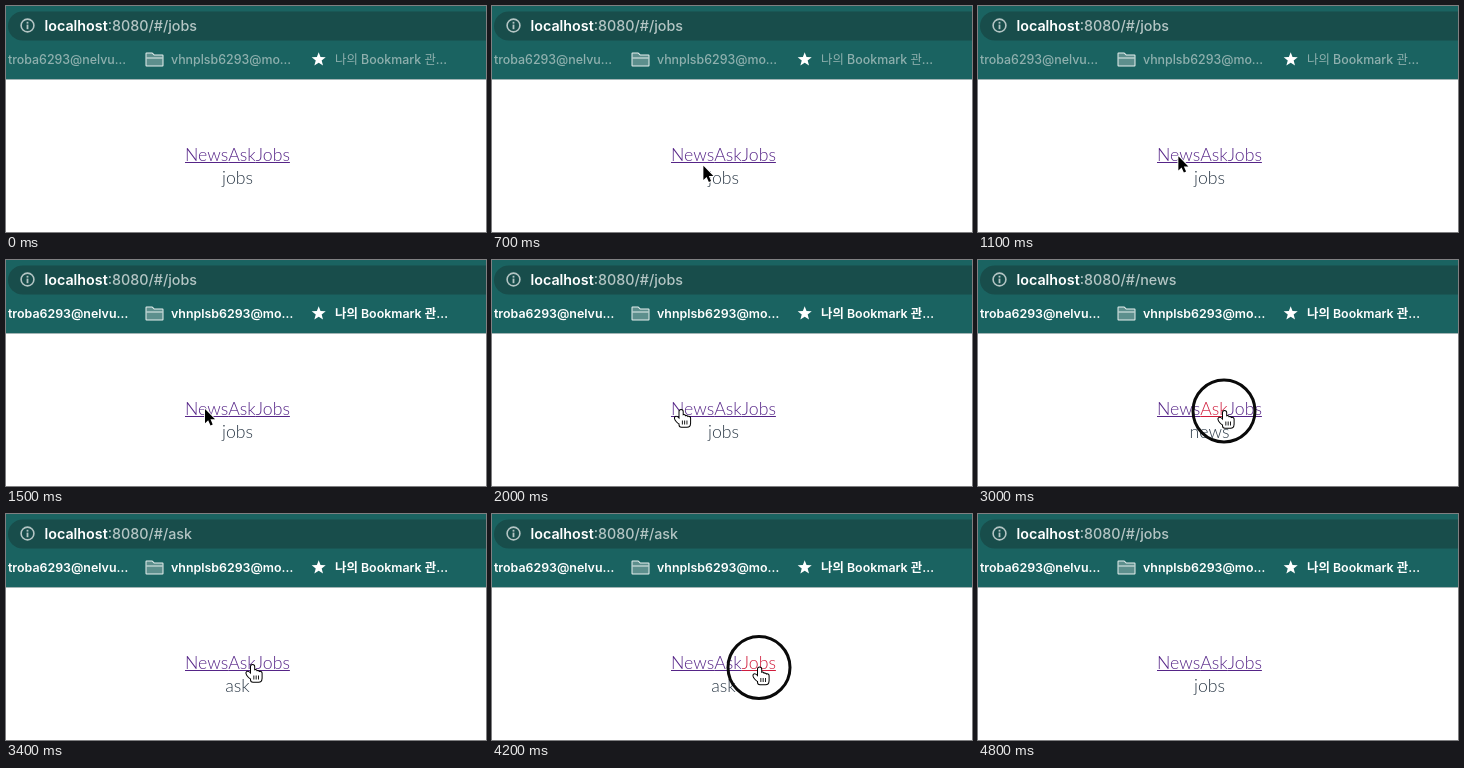
These frames come from a looping animation (480 by 226 pixels, 5000 ms). An HTML page with a canvas:

```html
<!DOCTYPE html>
<html lang="en">
<head>
<meta charset="utf-8">
<title>Hash routing demo</title>
<style>
  html, body { margin: 0; width: 100%; height: 100%; overflow: hidden; background: #fff; }
  canvas { display: block; width: 480px; height: 226px; }
</style>
</head>
<body>
<canvas id="stage"></canvas>
<script>
const W = 480, H = 226, LOOP = 5000, STEP = 100, TURN = 2 * Math.PI;
const UI = "Inter, 'Noto Sans CJK KR', 'Noto Sans CJK', sans-serif";
const PAGE = "300 17.7px Lato, sans-serif";
const canvas = document.getElementById("stage");
const ctx = canvas.getContext("2d");
const ratio = window.devicePixelRatio || 1;
canvas.width = W * ratio;
canvas.height = H * ratio;

const APPEAR = 500, HAND_ON = 1600, HAND_OFF = 4500, VANISH = 4800, FOCUS = 1200;
const entry = { x: 221, y: 168 };
const moves = [
  { from: APPEAR, to: 1300, x: 199, y: 149 },
  { from: 1500, to: 2000, x: 188.5, y: 149.5 },
  { from: 2500, to: 3000, x: 246, y: 150.5 },
  { from: 3400, to: 3800, x: 267, y: 153 },
  { from: 4400, to: 4700, x: 232, y: 195 }
];
const presses = [
  { link: "News", from: 2100, to: 2400 },
  { link: "Ask", from: 3000, to: 3300 },
  { link: "Jobs", from: 3800, to: 4300 }
];

const clamp = v => Math.min(1, Math.max(0, v));
const easeOut = k => 1 - (1 - k) ** 2;

function pointerAt(t) {
  return moves.reduce((pos, m) => {
    const k = easeOut(clamp((t - m.from) / (m.to - m.from)));
    return { x: pos.x + (m.x - pos.x) * k, y: pos.y + (m.y - pos.y) * k };
  }, entry);
}

function routeAt(t) {
  const done = presses.filter(p => t >= p.to).pop();
  return (done ? done.link : "Jobs").toLowerCase();
}

function text(str, x, y, font, color, align = "left") {
  ctx.font = font;
  ctx.fillStyle = color;
  ctx.textAlign = align;
  ctx.fillText(str, x, y);
  return ctx.measureText(str).width;
}

// The fill covers the inner half of the outline, so overlapping parts merge.
function paint(fill, stroke, width) {
  ctx.lineWidth = width;
  ctx.lineJoin = "round";
  ctx.strokeStyle = stroke;
  ctx.stroke();
  ctx.fillStyle = fill;
  ctx.fill();
}

function ring(x, y, radius, width, color) {
  ctx.beginPath();
  ctx.arc(x, y, radius, 0, TURN);
  ctx.lineWidth = width;
  ctx.strokeStyle = color;
  ctx.stroke();
}

function drawAddressBar(route) {
  ctx.fillStyle = "#1a6361";
  ctx.fillRect(0, 0, W, 73);
  ctx.fillStyle = "#a3b5b5";
  ctx.fillRect(0, 73, W, 1);
  ctx.fillStyle = "#184d4b";
  ctx.beginPath();
  ctx.roundRect(2, 5.5, W + 40, 29, 14.5);
  ctx.fill();

  const grey = "#b4c5c4";
  ring(21.5, 19.5, 6.4, 1.6, grey);
  ctx.fillStyle = grey;
  ctx.fillRect(20.6, 15.8, 1.8, 1.8);
  ctx.fillRect(20.6, 18.6, 1.8, 4.6);

  const font = "14.3px " + UI;
  const hostWidth = text("localhost", 38.5, 25, "600 " + font, "#fff");
  text(":8080/#/" + route, 38.5 + hostWidth, 25, "500 " + font, grey);
}

function drawFolder(x, y) {
  ctx.beginPath();
  ctx.moveTo(x, y);
  ctx.lineTo(x + 5.5, y);
  ctx.lineTo(x + 7.5, y + 2);
  ctx.lineTo(x + 16, y + 2);
  ctx.lineTo(x + 16, y + 12);
  ctx.lineTo(x, y + 12);
  ctx.closePath();
  paint("#5d8f8d", "#e6efee", 2);
  ctx.fillStyle = "#e6efee";
  ctx.fillRect(x, y + 4, 16, 1);
}

function drawStar(x, y) {
  ctx.beginPath();
  for (let i = 0; i < 10; i++) {
    const r = i % 2 ? 3.1 : 7.4, a = i * TURN / 10 - TURN / 4;
    ctx.lineTo(x + r * Math.cos(a), y + r * Math.sin(a));
  }
  ctx.fillStyle = "#fff";
  ctx.fill();
}

function drawBookmarks(active) {
  const color = active ? "#fff" : "#8fb0ae";
  const font = (active ? 600 : 500) + " 12.4px " + UI;
  text("troba6293@nelvu…", 2, 57.5, font, color);
  text("vhnplsb6293@mo…", 165, 57.5, font, color);
  text("나의 Bookmark 관…", 329, 57.5, font, color);
  drawFolder(140.5, 47.5);
  drawStar(312.7, 53.6);
}

function drawPage(route, pressed) {
  let x = 179;
  for (const link of ["News", "Ask", "Jobs"]) {
    const color = pressed === link ? "#d01c3c" : "#552487";
    const width = text(link, x, 154.5, PAGE, color);
    ctx.fillRect(x, 156, width, 1);
    x += width;
  }
  text(route, 231.5, 178, PAGE, "#2c3a48", "center");
}

function drawArrow() {
  ctx.beginPath();
  ctx.moveTo(0, 0);
  ctx.lineTo(0, 14.2);
  ctx.lineTo(3.2, 11.2);
  ctx.lineTo(5.5, 16.4);
  ctx.lineTo(7.7, 15.4);
  ctx.lineTo(5.5, 10.3);
  ctx.lineTo(10, 10.3);
  ctx.closePath();
  paint("#000", "#fff", 1.8);
}

function drawHand() {
  ctx.beginPath();
  ctx.ellipse(-2.4, 10.8, 1.8, 4.2, -0.7, 0, TURN);
  ctx.roundRect(-1, 0.5, 3.2, 13, 1.6);
  for (let i = 0; i < 3; i++) ctx.roundRect(1.8 + 2.4 * i, 5.6 + 0.8 * i, 3, 8, 1.5);
  ctx.roundRect(-1, 9, 10.5, 8.3, [0, 0, 3, 2]);
  paint("#fff", "#000", 2);
  ctx.fillStyle = "#000";
  for (let i = 0; i < 3; i++) ctx.fillRect(1.4 + 2.3 * i, 11, 0.9, 4);
}

function drawPointer(t, pressed) {
  if (t < APPEAR || t >= VANISH) return;
  const pos = pointerAt(t);
  ctx.save();
  ctx.translate(pos.x, pos.y);
  if (t >= HAND_ON && t < HAND_OFF) drawHand();
  else drawArrow();
  if (pressed) ring(0, 0.5, 31, 3, "#0a0a0a");
  ctx.restore();
}

function draw(now) {
  const t = Math.floor((now % LOOP) / STEP) * STEP;
  const press = presses.find(p => t >= p.from && t < p.to);
  const pressed = press && press.link;
  const route = routeAt(t);
  ctx.setTransform(ratio, 0, 0, ratio, 0, 0);
  ctx.fillStyle = "#fff";
  ctx.fillRect(0, 0, W, H);
  drawAddressBar(route);
  drawBookmarks(t >= FOCUS);
  drawPage(route, pressed);
  drawPointer(t, pressed);
}

let start;
function tick(now) {
  start ??= now;
  draw(now - start);
  requestAnimationFrame(tick);
}
requestAnimationFrame(tick);
</script>
</body>
</html>
```
